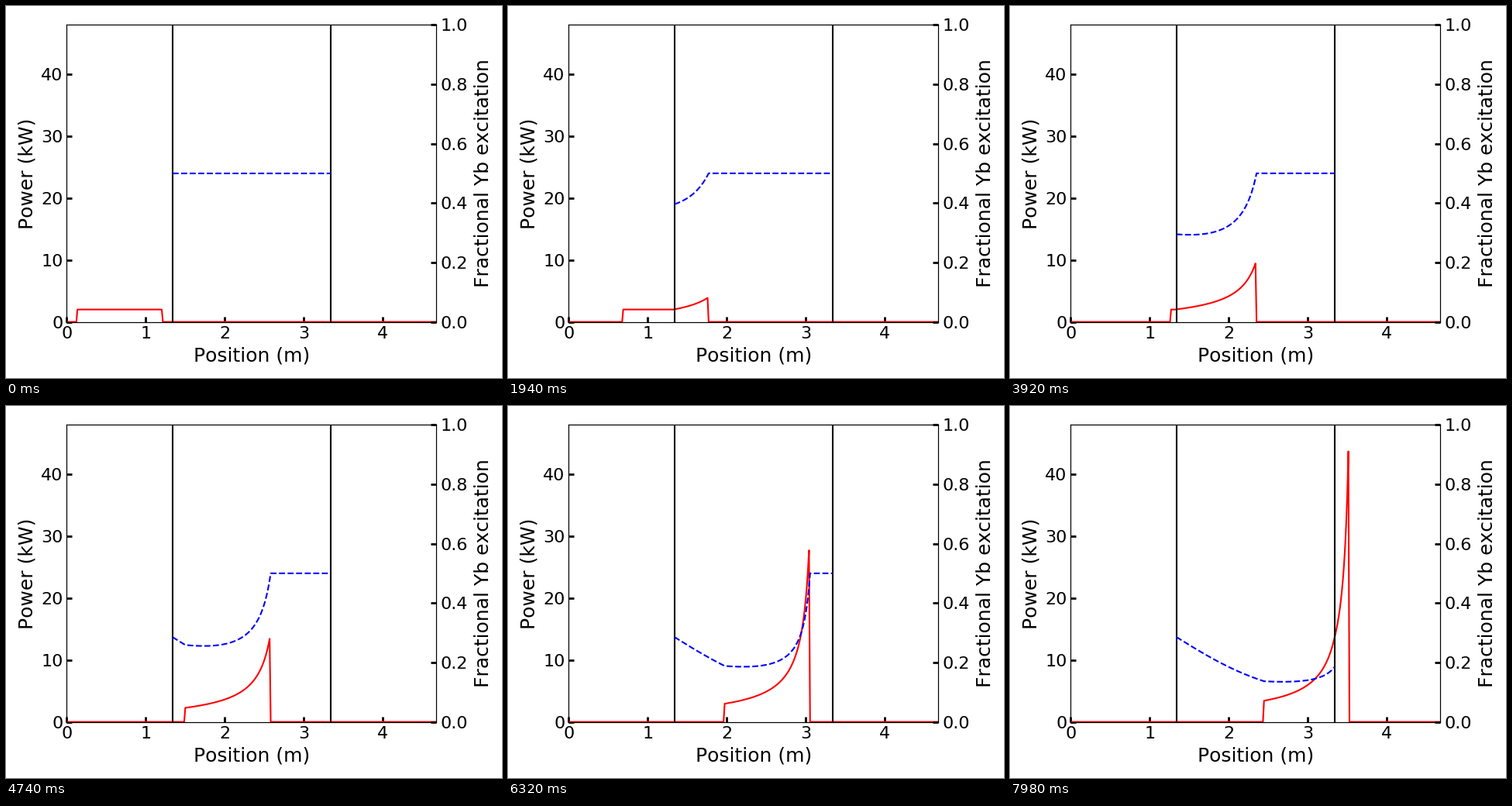
A matplotlib script that plays this animation: 640x480 px, repeating every 8 s.

```python
import numpy as np
import matplotlib.pyplot as plt
from matplotlib.animation import FuncAnimation

# Grid: lead-in, 2 m fibre, lead-out, all in equal cells
PAD, FIBRE = 99, 148
DX = 2.0 / FIBRE
CELLS = PAD + FIBRE + PAD

# Rectangular pulse and the amplifier constants
P_IN, LENGTH, FRONT = 2.0, 80, 89
B_START, B_CLEAR = 0.5, 0.07
GAIN = 0.0207                # small-signal gain per cell
DRAIN = 0.691 / LENGTH       # saturation per pulse sample

W, H, DPI = 640, 480, 100
TICK, LOOP = 20, 8000

cell = np.arange(CELLS + 1)
x = cell * DX
inside = cell[PAD:PAD + FIBRE + 1]


def power(step):
    """Saturated amplification of the travelling pulse."""
    behind = FRONT + step - cell
    on = (behind >= 0) & (behind < LENGTH)
    loss = np.exp(-GAIN * np.clip(cell - PAD + 1, 0, FIBRE + 1))
    left = np.exp(-DRAIN * np.clip(behind, 0, LENGTH))
    return np.where(on, P_IN / (1 - (1 - loss) * left), 0)


def excitation(step):
    """Excited fraction left in the fibre after the passed samples."""
    passed = np.clip(FRONT + step - inside + 1, 0, LENGTH)
    left = np.exp(-DRAIN * passed)
    loss = np.exp(-GAIN * (inside - PAD))
    share = loss * left / (1 - (1 - loss) * left)
    return B_CLEAR + (B_START - B_CLEAR) * share


def step_at(ms):
    """Steps come in threes, held for 20, 100 and 20 ms."""
    group, rest = divmod(ms, 140)
    return 3 * group + (rest >= 20) + (rest >= 120)


plt.rcParams.update({"font.family": "DejaVu Sans", "text.kerning_factor": 6})
fig, ax = plt.subplots(figsize=(W / DPI, H / DPI), dpi=DPI)
fig.subplots_adjust(left=78.4 / W, right=555.1 / W,
                    bottom=1 - 407.6 / H, top=1 - 24.2 / H)
ax2 = ax.twinx()

pulse, = ax.plot(x, power(0), "r", lw=1.5)
for edge in (PAD, PAD + FIBRE):
    ax.axvline(edge * DX, color="k", lw=1.5)
ions, = ax2.plot(x[inside], excitation(0), "b--", lw=1.5)

ax.set_xlim(0, x[-1])
ax.set_ylim(0, 48)
ax2.set_ylim(0, 1)
ax.set_xlabel("Position (m)", fontsize=18, labelpad=4.7)
ax.set_ylabel("Power (kW)", fontsize=18)
ax2.set_ylabel("Fractional Yb excitation", fontsize=18, labelpad=5.4)
for a in (ax, ax2):
    a.tick_params(direction="in", length=5, width=2, labelsize=16)
ax.tick_params(axis="x", pad=4.2)
ax2.tick_params(axis="y", pad=4.2)


def draw(i):
    step = step_at(i * TICK)
    pulse.set_ydata(power(step))
    ions.set_ydata(excitation(step))
    return pulse, ions


anim = FuncAnimation(fig, draw, frames=LOOP // TICK, interval=TICK,
                     repeat=True, repeat_delay=0)
plt.show()
```
